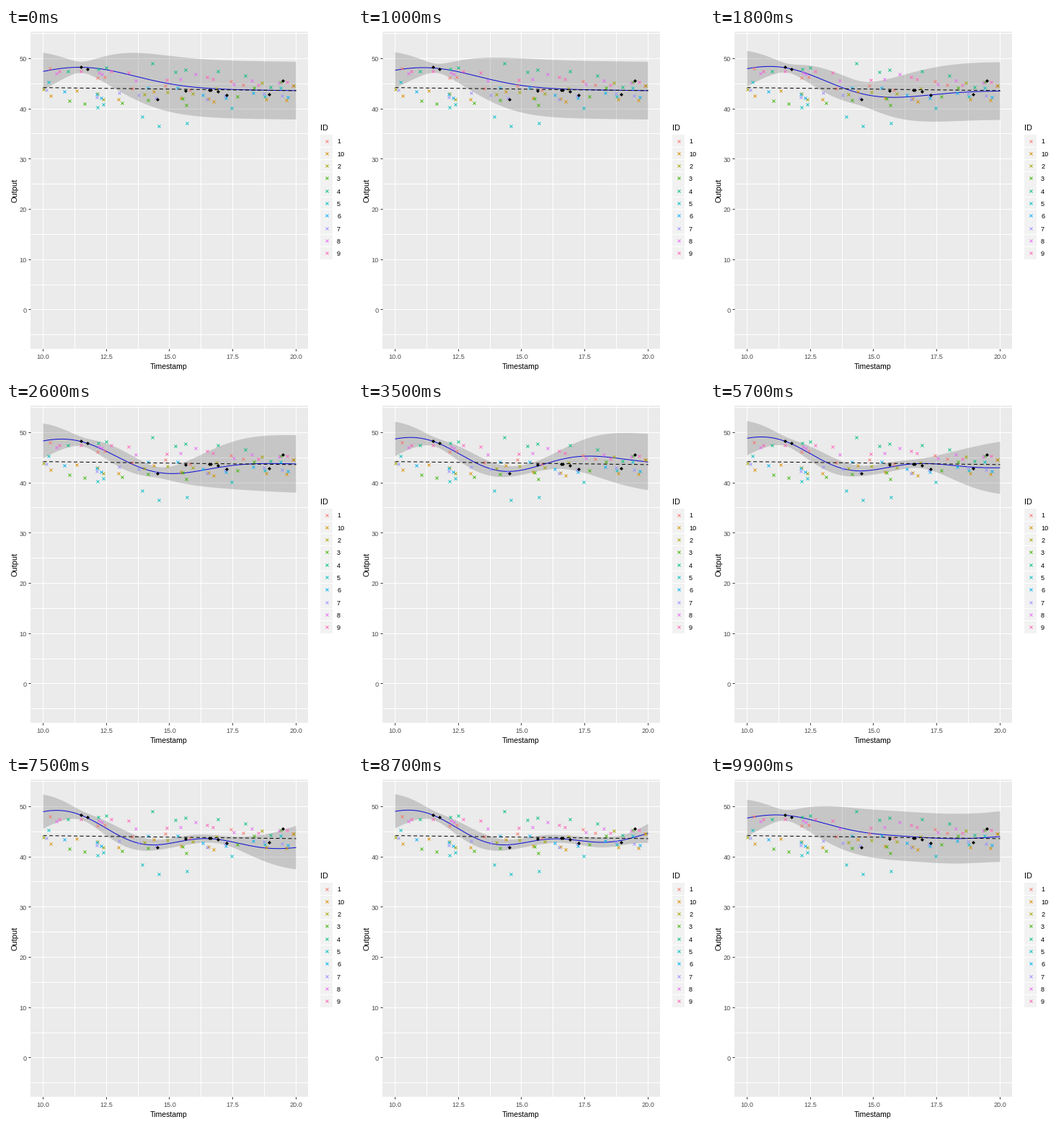
A matplotlib script that plays this animation: 480 px wide and 480 px high, repeating every 10 s.

```python
import numpy as np
import matplotlib.pyplot as plt
from matplotlib.animation import FuncAnimation
from matplotlib.patches import Polygon, Rectangle

PX = 0.72  # points per pixel at 100 dpi
plt.rcParams["font.family"] = "Liberation Sans"
rng = np.random.default_rng(12)


def to_x(v):
    return 51.5 + 35.1 * (v - 10)


def to_y(v):
    return 391.2 - 6.972 * v


# Each individual: id, colour, and its level at the start, middle and end
individuals = [
    ("1", "#F8766D", 47.5, 44.5, 44.0),
    ("10", "#D89000", 43.2, 42.8, 41.8),
    ("2", "#A3A500", 43.5, 43.0, 45.0),
    ("3", "#39B600", 42.5, 41.3, 46.0),
    ("4", "#00BF7D", 46.5, 48.8, 44.5),
    ("5", "#00BFC4", 46.0, 36.3, 44.5),
    ("6", "#00B0F6", 42.3, 43.8, 42.4),
    ("7", "#9590FF", 44.3, 41.7, 43.2),
    ("8", "#E76BF3", 47.0, 46.2, 45.3),
    ("9", "#FF62BC", 47.2, 46.3, 46.5),
]

# Gaussian process prediction from the first n observations
times = np.array([11.5, 11.75, 14.51, 15.64, 16.57, 16.63, 16.92, 17.25, 18.94, 19.47])
values = np.array([48.4, 47.9, 41.95, 43.65, 43.8, 43.8, 43.5, 42.8, 42.95, 45.65])
SIGNAL, NOISE, EXTRA, LENGTH2 = 8.5, 0.22, 0.1, 4.5
grid = np.linspace(10, 20, 201)


def prior(t):
    return 44.25 - 0.06 * (t - 10)


def kernel(a, b):
    return SIGNAL * np.exp(-(a[:, None] - b[None, :]) ** 2 / (2 * LENGTH2))


def predict(n):
    t, y = times[:n], values[:n]
    cross = kernel(t, grid)
    gain = np.linalg.solve(kernel(t, t) + NOISE * np.eye(n), cross)
    mean = prior(grid) + gain.T @ (y - prior(t))
    half = 1.96 * np.sqrt(SIGNAL - np.sum(gain * cross, axis=0) + EXTRA)
    return np.array([mean, mean - half, mean + half])


states = [predict(n) for n in range(1, 11)]

fig = plt.figure(figsize=(4.8, 4.8), dpi=100, facecolor="white")
ax = fig.add_axes([0, 0, 1, 1])
ax.set_xlim(0, 480)
ax.set_ylim(480, 0)
ax.axis("off")


def line(xs, ys, color, width=1.0, z=1, **kw):
    return ax.plot(xs, ys, color=color, lw=width * PX, zorder=z,
                   solid_capstyle="butt", **kw)[0]


def text(x, y, s, size, color="black", **kw):
    ax.text(x, y, s, fontsize=size * PX, color=color,
            va=kw.pop("va", "center_baseline"), **kw)


def crosses(xs, ys, color):
    ax.plot(xs, ys, "x", color=color, ms=5 * PX, mew=0.9 * PX, zorder=5)


# Panel, grid and axes; grid lines sit on whole pixels
ax.add_patch(Rectangle((34, 5), 385, 440, fc="#EBEBEB", ec="none", zorder=0))
for v in np.arange(10, 20.1, 1.25):
    x = to_x(v) - 0.6
    line([x, x], [5, 445], "white")
    if v % 2.5 == 0:
        line([x, x], [445, 448], "#333333")
        text(to_x(v), 455.5, f"{v:.1f}", 9.2, "#4D4D4D", ha="center")
for v in range(-5, 56, 5):
    y = to_y(v) - 0.82
    line([34, 419], [y, y], "white")
    if v % 10 == 0:
        line([31, 34], [y, y], "#333333")
        text(29, to_y(v) + 0.2, str(v), 9.2, "#4D4D4D", ha="right")
text(226, 469, "Timestamp", 10.5, ha="center")
text(12, 225, "Output", 11, ha="center", va="center", rotation=90)

# Legend and training data
text(436, 138.5, "ID", 11)
for i, (name, color, *levels) in enumerate(individuals):
    y = 156.5 + 17.3 * i
    ax.add_patch(Rectangle((436, y - 8.3), 17, 16.6, fc="#F2F2F2", ec="none"))
    crosses([444.5], [y], color)
    text(459, y + 0.5, name, 9.2)

    t = 10 + (np.arange(9) + rng.random(9)) * 10 / 9
    v = np.interp(t, [10, 15, 20], levels) + rng.normal(0, 0.7, 9)
    crosses(to_x(t), to_y(v), color)

# Prediction layers
gx = to_x(grid)
curve = line(gx, gx, "#0000FF", 1, 3)
band = Polygon(np.zeros((2, 2)), fc="#333333", ec="none", alpha=0.2, zorder=4)
ax.add_patch(band)
line(gx, to_y(prior(grid)), "black", 1, 6, dashes=(5, 3.5), dash_capstyle="butt")
ax.plot(to_x(times), to_y(values), "D", color="black", ms=3.1 * PX,
        mew=0.4 * PX, zorder=7)


def blend(frame):
    """Pause on each state, then move linearly to the next one."""
    state, step = divmod(frame, 10)
    pause = 3 if state == 0 else 4
    t = max(0, step - pause) / (10 - pause)
    return states[state] * (1 - t) + states[(state + 1) % 10] * t


def update(frame):
    mean, low, high = to_y(blend(frame))
    curve.set_ydata(mean)
    band.set_xy(np.column_stack([np.r_[gx, gx[::-1]], np.r_[high, low[::-1]]]))
    return curve, band


anim = FuncAnimation(fig, update, frames=100, interval=100, repeat=True,
                     repeat_delay=0, init_func=lambda: update(0))
plt.show()
```
